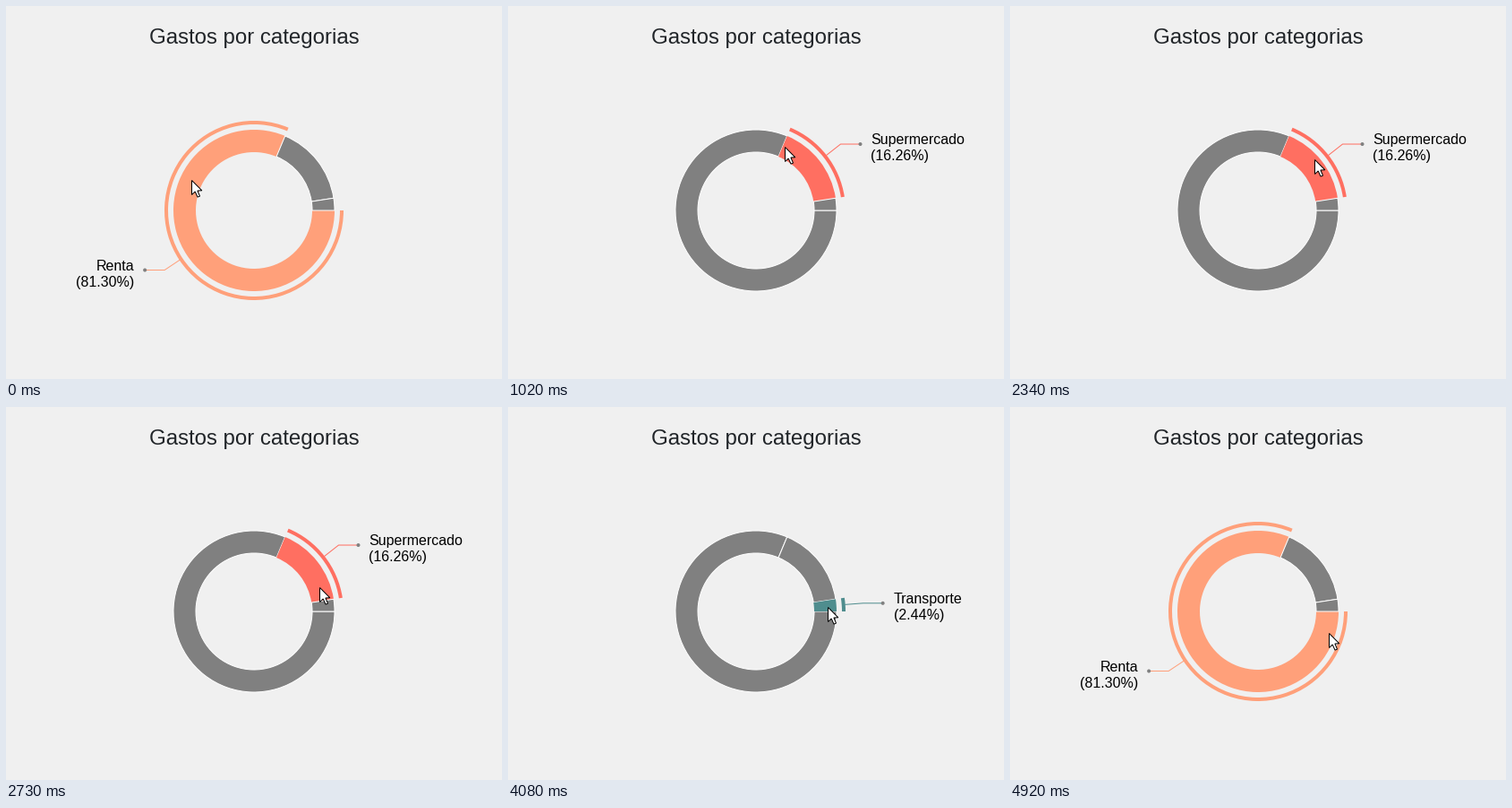
A matplotlib script that plays this animation: 554 px wide and 416 px high, repeating every 4950 ms.

```python
import numpy as np
import matplotlib.pyplot as plt
from matplotlib.animation import FuncAnimation
from matplotlib.patches import Circle, Polygon, Wedge

W, H, DPI = 554, 416, 64
STEP, LOOP = 30, 4950
PT = 72 / DPI  # points per pixel
CX, CY, R_IN, R_OUT = 277, 228, 65, 90
GREY = "#808080"

SLICES = [
    ("Renta", 81.30, "#ffa07a"),
    ("Supermercado", 16.26, "#ff6f61"),
    ("Transporte", 2.44, "#4f8d8e"),
]
EDGES = np.cumsum([0] + [share for _, share, _ in SLICES]) * 3.6

# (time, x, y) of the pointer tip
POINTER = np.array([
    (0, 207, 194), (780, 287, 158), (960, 306, 157), (1530, 333, 161),
    (1700, 340, 171), (2500, 340, 171), (2900, 357, 223),
    (4400, 357, 223), (4700, 356, 252), (4950, 356, 252),
])
# (start time, hovered slice)
HOVERS = [(0, 0), (960, 1), (2850, 2), (4470, 0)]
ARROW = np.array([
    (0, 0), (0, 16), (3.7, 12.5), (6.5, 18.6),
    (9, 17.6), (6.4, 11.5), (11.3, 11.3),
])

fig = plt.figure(figsize=(W / DPI, H / DPI), dpi=DPI, facecolor="#f0f0f0")
ax = fig.add_axes([0, 0, 1, 1])
ax.set(xlim=(0, W), ylim=(H, 0))
ax.axis("off")


def label(x, y, text, size, align, color="black"):
    return ax.text(x, y, text, size=size * PT, ha=align, va="baseline",
                   color=color, family="Liberation Sans", zorder=4)


def ring(r_in, r_out, start, end, **style):
    return ax.add_patch(Wedge((CX, CY), r_out, start, end,
                              width=r_out - r_in, **style))


def polar(radius, angle):
    a = np.radians(angle)
    return CX + radius * np.cos(a), CY + radius * np.sin(a)


def build_view(active):
    """All artists of the chart with one slice highlighted."""
    parts = []
    for i, (_, _, color) in enumerate(SLICES):
        if i == active:
            style = dict(fc=color, ec="none", lw=0)
        else:
            style = dict(fc=GREY, ec="white", lw=PT)
        parts.append(ring(R_IN, R_OUT, EDGES[i], EDGES[i + 1],
                          zorder=1 + i / 10, **style))

    name, share, color = SLICES[active]
    start, end = EDGES[active:active + 2]
    mid = (start + end) / 2
    parts.append(ring(R_OUT + 6, R_OUT + 10, start, end,
                      fc=color, ec="none", lw=0, zorder=2))

    sx, sy = polar(R_OUT + 10, mid)
    mx, my = polar(R_OUT + 30, mid)
    side = 1 if mx > CX else -1
    ex = mx + 22 * side
    parts += ax.plot([sx, mx, ex], [sy, my, my], color=color, lw=PT, zorder=2)
    parts.append(ax.add_patch(Circle((ex, my), 2, fc=GREY, ec="none", zorder=3)))

    align = "left" if side > 0 else "right"
    for dy, text in ((0, name), (18, f"({share:.2f}%)")):
        parts.append(label(ex + 12 * side, my + dy, text, 16, align))
    return parts


label(CX, 42, "Gastos por categorias", 24, "center", "#212529")
views = [build_view(i) for i in range(len(SLICES))]
pointer = ax.add_patch(Polygon(ARROW, fc="white", ec="black", lw=PT,
                               joinstyle="miter", zorder=5))


def update(frame):
    t = frame * STEP
    active = [i for start, i in HOVERS if start <= t][-1]
    for i, parts in enumerate(views):
        for part in parts:
            part.set_visible(i == active)
    tip = [round(np.interp(t, POINTER[:, 0], POINTER[:, k])) for k in (1, 2)]
    pointer.set_xy(ARROW + tip + 0.5)
    return [pointer, *sum(views, [])]


anim = FuncAnimation(fig, update, frames=LOOP // STEP, interval=STEP,
                     repeat=True, repeat_delay=0)
plt.show()
```
